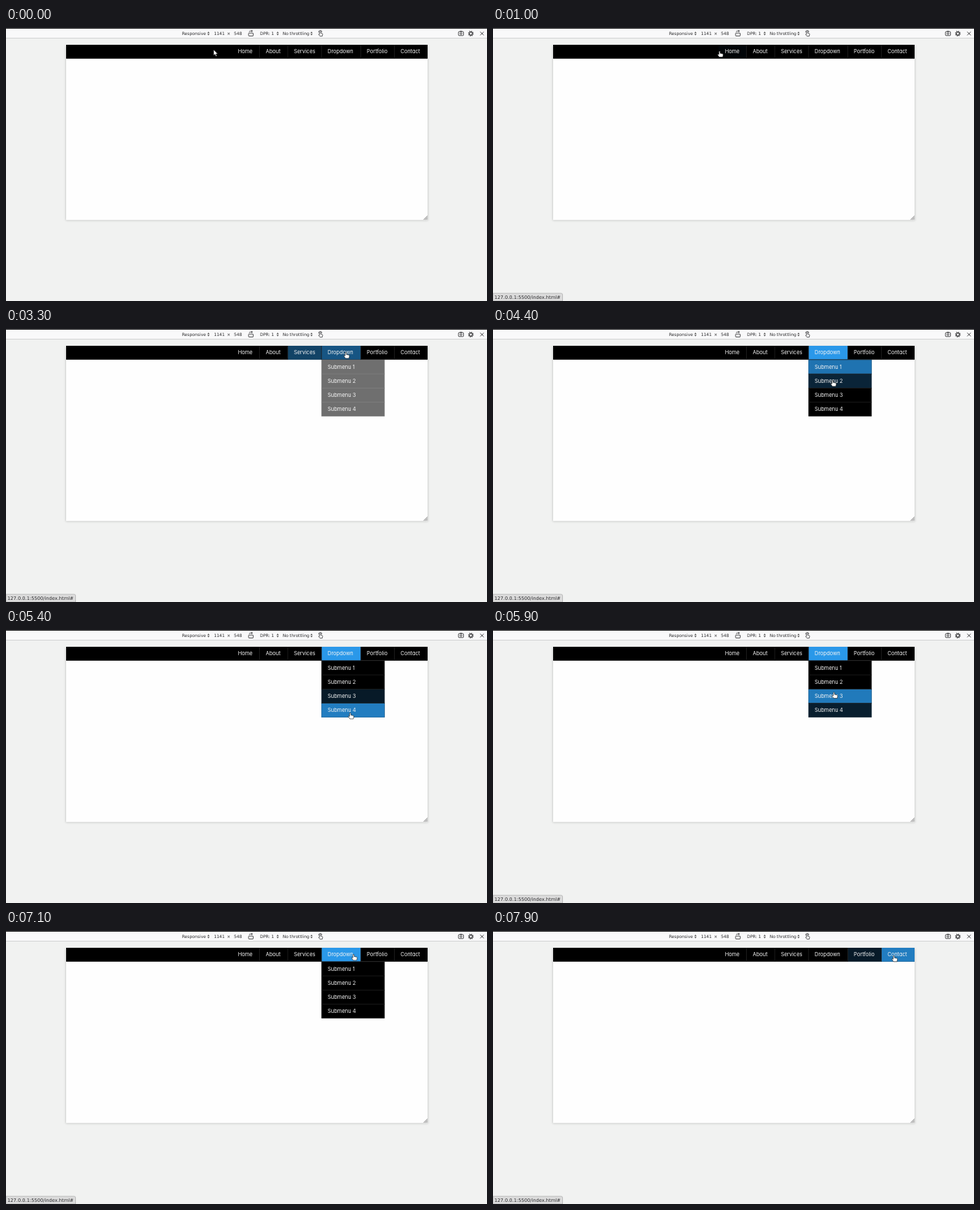
These frames come from a looping animation (688x390 px, 8 s). An HTML page:

```html
<!DOCTYPE html>
<html lang="en">
<head>
<meta charset="utf-8">
<title>Navigation menu with dropdown</title>
<style>
html, body { margin: 0; width: 100%; height: 100%; overflow: hidden; background: #f1f2f1; }
svg { display: block; width: 100vw; height: 100vh; }
.ui { font: 6.05px "DejaVu Sans", sans-serif; fill: #2c2c2e; }
.nav { font: 7.5px Inter, "Open Sans", sans-serif; font-feature-settings: "cv11"; fill: #f4f4f4; }
.icon { fill: none; stroke: #38383a; stroke-width: .9; }
</style>
</head>
<body>
<svg viewBox="0 0 688 390">
  <defs>
    <filter id="soft" x="-5%" y="-5%" width="110%" height="110%"><feGaussianBlur stdDeviation="1.6"/></filter>
  </defs>
  <rect width="688" height="390" fill="#f1f2f1"/>
  <rect width="688" height="14.5" fill="#f9f9fa"/>
  <rect width="688" height="1" fill="#1b1b1d"/>
  <rect y="14" width="688" height="1" fill="#d2d3d3"/>

  <g class="ui">
    <text x="251.7" y="10.2">Responsive</text>
    <text x="297.4" y="10.2">1141</text>
    <text x="316" y="10.2">×</text>
    <text x="326" y="10.2">548</text>
    <text x="363.3" y="10.2">DPR: 1</text>
    <text x="395.7" y="10.2">No throttling</text>
  </g>
  <g id="arrows" fill="#444"></g>
  <g class="icon">
    <rect x="347" y="7.2" width="6.6" height="4.2" rx=".6"/>
    <path d="M348 5.6q.2-1.3 1.6-1.3h2.6M351 3l1.5 1.3L351 5.6"/>
    <path d="M448.7 8.4V5.2q.9-1 1.7 0V7.4l2 .5q.7.3.5 1.2l-.6 2.6h-3.2l-2-2.7q.3-1 1.6-.2M447.3 6.5a2.3 2.3 0 1 1 4.5-.6" stroke-width=".8"/>
    <rect x="647.2" y="5.2" width="7.2" height="5.6" rx=".8"/>
    <path d="M649.3 4.6h3"/>
    <circle cx="650.8" cy="8" r="1.3"/>
    <circle cx="664.9" cy="7.9" r="2.2" stroke-width="1.3"/>
    <circle cx="664.9" cy="7.9" r="3.4" stroke-width="1.3" stroke-dasharray="1.2 1.47"/>
    <path d="M678.3 5.4l5 5M683.3 5.4l-5 5"/>
  </g>

  <rect x="85.5" y="25" width="518" height="250" fill="#aeb0ae" opacity=".7" filter="url(#soft)"/>
  <rect x="86" y="24" width="517" height="250.3" fill="#fefefe"/>
  <path d="M603 267.5v6.5h-6.5z" fill="#c9c9c9"/>
  <path d="M597.5 273.5l5-5M600 273.5l2.5-2.5" stroke="#999" stroke-width=".6"/>
  <rect x="86" y="24" width="517" height="19.8"/>
  <g id="bar" class="nav"></g>
  <g id="sub" class="nav"></g>

  <g id="status">
    <path d="M0 379h97.5q2 0 2 2v9H0z" fill="#dcdcdc" stroke="#b0b0b0" stroke-width=".8"/>
    <text x="2" y="387" class="ui" style="font-size:6.7px">127.0.0.1:5500/index.html#</text>
  </g>

  <path id="arrow" d="M0 0v8.2l1.9-1.7 1.3 2.9 1.4-.6-1.3-2.8h2.6z" fill="#fff" stroke="#111" stroke-width=".6"/>
  <path id="hand" d="M-.9.5Q0-.6.9.5V3.1l3.3.7q1.2.4 1 1.6L4.6 8.6H-.4L-2.6 5.4q-.2-1.2 1-.9l.7.6z" fill="#fff" stroke="#111" stroke-width=".6"/>
</svg>
<script>
const LOOP = 8000, STEP = 100, FADE = 400, BLUE = '#2a98e9';
const $ = id => document.getElementById(id);

function add(parent, tag, attrs, text) {
  const el = document.createElementNS('http://www.w3.org/2000/svg', tag);
  for (const k in attrs) el.setAttribute(k, attrs[k]);
  if (text) el.textContent = text;
  return parent.appendChild(el);
}

// label, text x, left edge, right edge, hover start and end
const links = [
  ['Home', 331.7, 322.5, 362.5, 980, 1450],
  ['About', 371.6, 362.5, 403, 1450, 2450],
  ['Services', 411.7, 403, 451.2, 2450, 3170],
  ['Dropdown', 460, 451.2, 507.4, 3170, 7280],
  ['Portfolio', 516, 507.4, 555.6, 7280, 7690],
  ['Contact', 564.2, 555.6, 603, 7690, 9000]
];
// hover periods of each submenu row
const rows = [
  [[3900, 4330], [6325, 6700]],
  [[4330, 4780], [5960, 6325]],
  [[4780, 5190], [5700, 5960]],
  [[5190, 5700]]
];
const ROW = 20.25, TOP = 43.8, LEFT = 451.2, WIDTH = 90.4;

// time, x, y of the pointer tip
const path = [
  [0, 297, 31], [900, 318, 32], [1000, 324, 33], [1450, 363, 33],
  [1900, 385.5, 29.5], [2050, 388, 30], [2450, 403, 31], [2900, 436, 33],
  [3170, 452, 33], [3300, 486, 33.3], [3700, 486, 36], [3900, 486, 44],
  [4330, 486, 64.2], [4400, 485.8, 73.3], [4780, 487, 84.5], [5190, 490, 104.7],
  [5400, 492.3, 118.4], [5550, 492, 118.4], [5700, 490, 104.5], [5960, 487, 84.3],
  [6325, 485, 64], [6400, 484.4, 56.2], [6700, 486, 43.8], [7000, 491, 34],
  [7280, 508, 32], [7690, 556, 34], [7900, 573.3, 35.2], [8000, 575, 35.5]
];

for (const x of [289.6, 388.6, 437])
  add($('arrows'), 'path', { d: `M${x - 1.6} 7.3l1.6-2 1.6 2zM${x - 1.6} 8.5l1.6 2 1.6-2z` });

const linkFills = links.map(([label, tx, x, right], i) => {
  const fill = add($('bar'), 'rect', { x, y: 24, width: right - x, height: 19.8, fill: BLUE });
  if (i) add($('bar'), 'rect', { x: x - .4, y: 24, width: .8, height: 19.8, fill: '#222' });
  add($('bar'), 'text', { x: tx, y: 36.4 }, label);
  return fill;
});

add($('sub'), 'rect', { x: LEFT, y: TOP, width: WIDTH, height: ROW * 4, fill: '#000' });
const rowFills = rows.map((_, i) => {
  const y = TOP + i * ROW;
  const fill = add($('sub'), 'rect', { x: LEFT, y, width: WIDTH, height: ROW, fill: BLUE });
  add($('sub'), 'rect', { x: LEFT, y: y - .3, width: WIDTH, height: .7, fill: '#222' });
  add($('sub'), 'text', { x: 460, y: y + 12.9 }, 'Submenu ' + (i + 1));
  return fill;
});

// the CSS "ease" curve, cubic-bezier(.25, .1, .25, 1)
function ease(p) {
  if (p <= 0) return 0;
  if (p >= 1) return 1;
  let lo = 0, hi = 1;
  for (let i = 0; i < 20; i++) {
    const u = (lo + hi) / 2;
    const x = .75 * u * (1 - u) + u ** 3;
    if (x < p) lo = u; else hi = u;
  }
  return .3 * lo * (1 - lo) ** 2 + 3 * lo * lo * (1 - lo) + lo ** 3;
}

const glow = (t, [a, b]) =>
  ease((Math.min(t, b) - a) / FADE) * (1 - ease((t - b) / FADE));

function pointer(t) {
  const i = Math.max(1, path.findIndex(p => p[0] >= t));
  const [a, x0, y0] = path[i - 1], [b, x1, y1] = path[i];
  const k = (t - a) / (b - a);
  return [x0 + (x1 - x0) * k, y0 + (y1 - y0) * k];
}

const show = (id, on) => $(id).setAttribute('visibility', on ? 'visible' : 'hidden');

function draw(t) {
  links.forEach((l, i) => linkFills[i].setAttribute('opacity', glow(t, l.slice(4))));
  rows.forEach((spans, i) =>
    rowFills[i].setAttribute('opacity', Math.max(...spans.map(s => glow(t, s)))));
  $('sub').setAttribute('opacity', glow(t, links[3].slice(4)));
  const onLink = t >= 1000;
  show('arrow', !onLink);
  show('hand', onLink);
  show('status', onLink && !(t >= 5200 && t < 5700));
  const [x, y] = pointer(t);
  $(onLink ? 'hand' : 'arrow').setAttribute('transform', `translate(${x} ${y})`);
}

const start = performance.now();
function tick() {
  const t = (performance.now() - start) % LOOP;
  draw(Math.floor(t / STEP) * STEP);
  requestAnimationFrame(tick);
}
tick();
</script>
</body>
</html>
```
